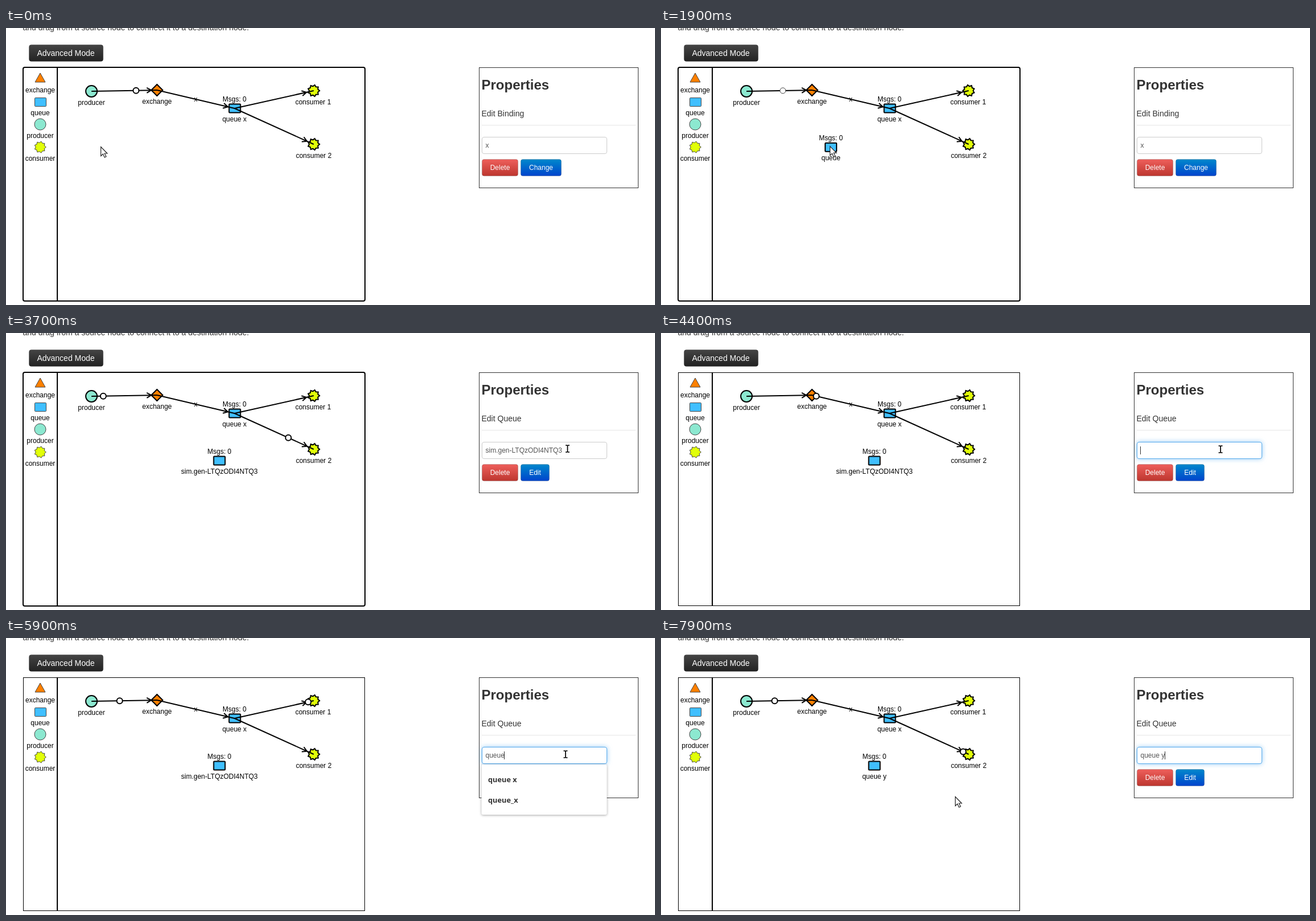
Recreate the animation shown at these times as an HTML page. Size 1139x486 px, loop 8 s.

```html
<!DOCTYPE html>
<html lang="en">
<head>
<meta charset="utf-8">
<title>Message queue simulator</title>
<style>
html, body { margin: 0; width: 100%; height: 100%; overflow: hidden; background: #fff; }
svg { display: block; }
text { font: 12px "Liberation Sans", Arial, sans-serif; white-space: pre; }
.mid { text-anchor: middle; }
.page { font-size: 14px; fill: #333; }
.light { fill: #fff; }
.line { fill: none; stroke: #000; stroke-width: 2; }
.node { stroke: #000; stroke-width: 2; }
.tool { stroke: #444; stroke-width: 1; }
.exchange { fill: #ff8000; }
.queue { fill: #40bfff; }
.producer { fill: #8ce8d0; }
.consumer { fill: #e1ff08; }
#ball { fill: #fff; stroke: #000; }
#popup text { font: 600 12.8px "Noto Sans", sans-serif; fill: #333; }
#popup rect { filter: drop-shadow(0 1px 2px rgba(0, 0, 0, .35)); }
#glow { filter: drop-shadow(0 0 4px rgba(82, 168, 236, .6)); }
</style>
</head>
<body>
<svg id="stage" width="1139" height="486" viewBox="0 0 1139 486">
  <defs>
    <linearGradient id="dark" x2="0" y2="1"><stop stop-color="#444"/><stop offset="1" stop-color="#222"/></linearGradient>
    <linearGradient id="red" x2="0" y2="1"><stop stop-color="#ee5f5b"/><stop offset="1" stop-color="#bd362f"/></linearGradient>
    <linearGradient id="blue" x2="0" y2="1"><stop stop-color="#08c"/><stop offset="1" stop-color="#04c"/></linearGradient>
  </defs>
  <text class="page" x="29.5" y="4">and drag from a source node to connect it to a destination node.</text>
  <rect x="40.5" y="29.5" width="130" height="29" rx="4" fill="url(#dark)" stroke="#000" stroke-opacity=".25"/>
  <text class="page light mid" x="105" y="49">Advanced Mode</text>

  <rect id="frame" fill="none" stroke="#000"/>
  <path class="line" d="M90 70V478"/>
  <g id="scene"></g>
  <g id="newQueue">
    <rect class="node queue" x="-10" y="-7.5" width="20" height="15" rx="1"/>
    <text class="mid" y="-12">Msgs: 0</text>
    <text class="mid" y="23" id="queueName"></text>
  </g>
  <g id="balls"></g>

  <rect x="830.5" y="69.5" width="279" height="211" fill="none" stroke="#333"/>
  <text class="page" x="834.5" y="108" style="font-weight:bold;font-size:24px">Properties</text>
  <text class="page" x="834.5" y="155" id="heading"></text>
  <path d="M835 170.5H1105" stroke="#e5e5e5"/>
  <rect id="glow" x="835.5" y="191.5" width="219" height="29" rx="3.5" fill="#fff" stroke="#52a8ec"/>
  <rect id="field" x="835.5" y="191.5" width="219" height="29" rx="3.5" fill="#fff" stroke="#ccc"/>
  <text id="value" x="841.5" y="210" fill="#555"></text>
  <path id="caret" d="M.5 199V213" stroke="#333"/>
  <rect x="835.5" y="230.5" width="63" height="29" rx="3.5" fill="url(#red)" stroke="#000" stroke-opacity=".18"/>
  <text class="light mid" x="867" y="249">Delete</text>
  <rect id="action" x="903.5" y="230.5" height="29" rx="3.5" fill="url(#blue)" stroke="#000" stroke-opacity=".18"/>
  <text class="light mid" id="actionText" y="249"></text>

  <g id="popup">
    <rect id="popupBox" x="834.5" y="222" width="220" rx="3" fill="#fff"/>
    <text x="846" y="252.5">queue x</text>
    <text x="846" y="288.5" id="second">queue_x</text>
  </g>

  <path id="arrow" d="M.5 .5V16.5L4.2 13L7 19L9.8 17.7L7 12H11.7Z" fill="#fff" stroke="#222" stroke-width="1.2"/>
  <g id="beam" fill="none">
    <path d="M-4 -6.5H4M-4 6.5H4M0 -6V6" stroke="#fff" stroke-width="4"/>
    <path d="M-3.5 -6H-1L0 -5L1 -6H3.5M-3.5 6H-1L0 5L1 6H3.5M0 -5V5" stroke="#000" stroke-width="1.7"/>
  </g>
</svg>
<script>
const $ = id => document.getElementById(id);
const LOOP = 8000, STEP = 100;
const HOP = 800, PERIOD = 2000, FIRST = -544;
const ID_NAME = "sim.gen-LTQzODI4NTQ3";

const producer = [150, 111], exchange = [265, 109], queue = [401, 141];
const consumers = [[540, 110], [540, 204]];

// [time, x, y]
const pointer = [
  [0, 166, 208], [100, 166, 208], [800, 63, 127], [1200, 63, 127], [1800, 290, 206],
  [2400, 373, 222], [2800, 373, 222], [3400, 964, 206], [3600, 986, 203], [3800, 985, 203],
  [4000, 982, 204], [7100, 982, 204], [7500, 600, 302], [7900, 516, 278]
];
// [time, field text]
const typing = [
  [0, "x"], [2900, ID_NAME], [4300, ""], [4900, "q"], [5200, "qu"], [5400, "que"],
  [5600, "queu"], [5800, "queue"], [6000, "queue "], [6700, "queue y"]
];

const label = (x, y, s) => `<text class="mid" x="${x}" y="${y}">${s}</text>`;
const box = (x, y, cls) =>
  `<rect class="${cls} queue" x="${x - 10}" y="${y - 7.5}" width="20" height="15" rx="1"/>`;
const disc = (x, y, cls) => `<circle class="${cls} producer" cx="${x}" cy="${y}" r="10"/>`;

function gear(x, y, cls, id = "") {
  const points = Array.from({ length: 18 }, (_, i) => {
    const a = i * Math.PI / 9, r = i % 2 ? 7.8 : 10.3;
    return (r * Math.cos(a)).toFixed(1) + "," + (r * Math.sin(a)).toFixed(1);
  });
  return `<g transform="translate(${x} ${y})"><polygon id="${id}" class="${cls} consumer" points="${points.join(" ")}"/></g>`;
}

function edge([x1, y1], [x2, y2], gap) {
  const length = Math.hypot(x2 - x1, y2 - y1);
  const angle = Math.atan2(y2 - y1, x2 - x1) * 180 / Math.PI;
  const tip = length - gap;
  return `<path class="line" transform="translate(${x1} ${y1}) rotate(${angle})"
    d="M0 0H${length}M${tip - 8} -4.5L${tip} 0L${tip - 8} 4.5"/>`;
}

$("scene").innerHTML =
  `<path class="tool exchange" d="M60 79L69 95H51Z"/>` + label(60, 113, "exchange") +
  box(60.5, 130, "tool") + label(60, 153, "queue") +
  disc(60, 169, "tool") + label(60, 193, "producer") +
  gear(60, 209, "tool") + label(60, 233, "consumer") +
  disc(...producer, "node") + label(150, 135, "producer") +
  `<path class="node exchange" d="M265 99L275 109L265 119L255 109Z"/>` + label(265, 133, "exchange") +
  box(401.5, 141, "node") + label(401, 129, "Msgs: 0") + label(401, 164, "queue x") +
  consumers.map(([x, y], i) => gear(x, y, "node", "gear" + i) + label(x - 1 + i, y + 24, "consumer " + (i + 1))).join("") +
  edge(producer, exchange, 10) + edge(exchange, queue, 12) +
  consumers.map(c => edge(queue, c, 13)).join("") + label(333, 129, "x");

const show = (id, on) => $(id).style.display = on ? "" : "none";
const move = (id, x, y) => $(id).setAttribute("transform", `translate(${x} ${y})`);
const attrs = (id, values) => Object.entries(values).forEach(([k, v]) => $(id).setAttribute(k, v));
const mix = (a, b, f) => a + (b - a) * f;

function pointerAt(t) {
  const i = pointer.findIndex(k => k[0] > t);
  if (i < 0) return pointer.at(-1).slice(1);
  const [t0, x0, y0] = pointer[i - 1], [t1, x1, y1] = pointer[i];
  const f = (t - t0) / (t1 - t0), eased = f * f * (3 - 2 * f);
  return [mix(x0, x1, eased), mix(y0, y1, eased)];
}

function drawMessages(t) {
  const clock = t < 2500 ? t : t - STEP;
  const thin = t >= 1300 && t < 2800;
  let balls = "";
  const turn = [0, 0];
  for (let k = 0; FIRST + k * PERIOD <= clock; k++) {
    const age = clock - FIRST - k * PERIOD;
    const path = [producer, exchange, queue, consumers[k % 2]];
    const hop = Math.floor(age / HOP);
    if (hop > 2) {
      if (age < 3 * HOP + STEP) turn[k % 2] = 20;
      continue;
    }
    const f = age / HOP - hop, a = path[hop], b = path[hop + 1];
    balls += `<circle cx="${mix(a[0], b[0], f)}" cy="${mix(a[1], b[1], f)}" r="5"
      fill="#fff" stroke="${thin ? "#444" : "#000"}" stroke-width="${thin ? 1 : 2}"/>`;
  }
  $("balls").innerHTML = balls;
  turn.forEach((angle, i) => $("gear" + i).setAttribute("transform", `rotate(${angle})`));
}

function drawPanel(t) {
  const editing = t >= 2900, focused = t >= 3900;
  const [since, text] = typing.findLast(k => k[0] <= t);
  $("heading").textContent = editing ? "Edit Queue" : "Edit Binding";
  $("actionText").textContent = editing ? "Edit" : "Change";
  attrs("actionText", { x: editing ? 928.5 : 939 });
  attrs("action", { width: editing ? 50 : 71 });
  $("value").textContent = text;
  show("field", !focused);
  show("glow", focused);
  show("caret", focused && Math.floor((t - since) / 600) % 2 === 0);
  move("caret", Math.round(841 + (text ? $("value").getComputedTextLength() : 0)), 0);
  attrs("frame", focused
    ? { x: 30.5, y: 69.5, width: 599, height: 409, rx: 0, "stroke-width": 1 }
    : { x: 30, y: 69, width: 600, height: 410, rx: 3, "stroke-width": 2 });

  const single = t >= 6000, fading = t >= 6800;
  show("popup", t >= 4900 && t < 6900);
  show("second", !single);
  attrs("popupBox", { height: single ? 52 : 88 });
  attrs("popup", {
    opacity: fading ? .45 : 1,
    transform: fading ? "translate(944 248) scale(.98) translate(-944 -248)" : ""
  });
}

function drawPointer(t) {
  const [x, y] = pointerAt(t);
  const overField = x > 835 && x < 1055 && y > 191 && y < 221;
  show("arrow", !overField);
  show("beam", overField);
  move(overField ? "beam" : "arrow", x, y);

  const [qx, qy] = t < 2800 ? [x + 2, y + 2] : [374.5, 224];
  show("newQueue", t >= 1300);
  move("newQueue", qx, qy);
  $("queueName").textContent = t < 2900 ? "queue" : t < 7200 ? ID_NAME : "queue y";
}

function render(now) {
  const t = Math.floor(now % LOOP / STEP) * STEP;
  drawMessages(t);
  drawPanel(t);
  drawPointer(t);
}

const start = performance.now();
function tick() {
  render(performance.now() - start);
  requestAnimationFrame(tick);
}
tick();
</script>
</body>
</html>
```
